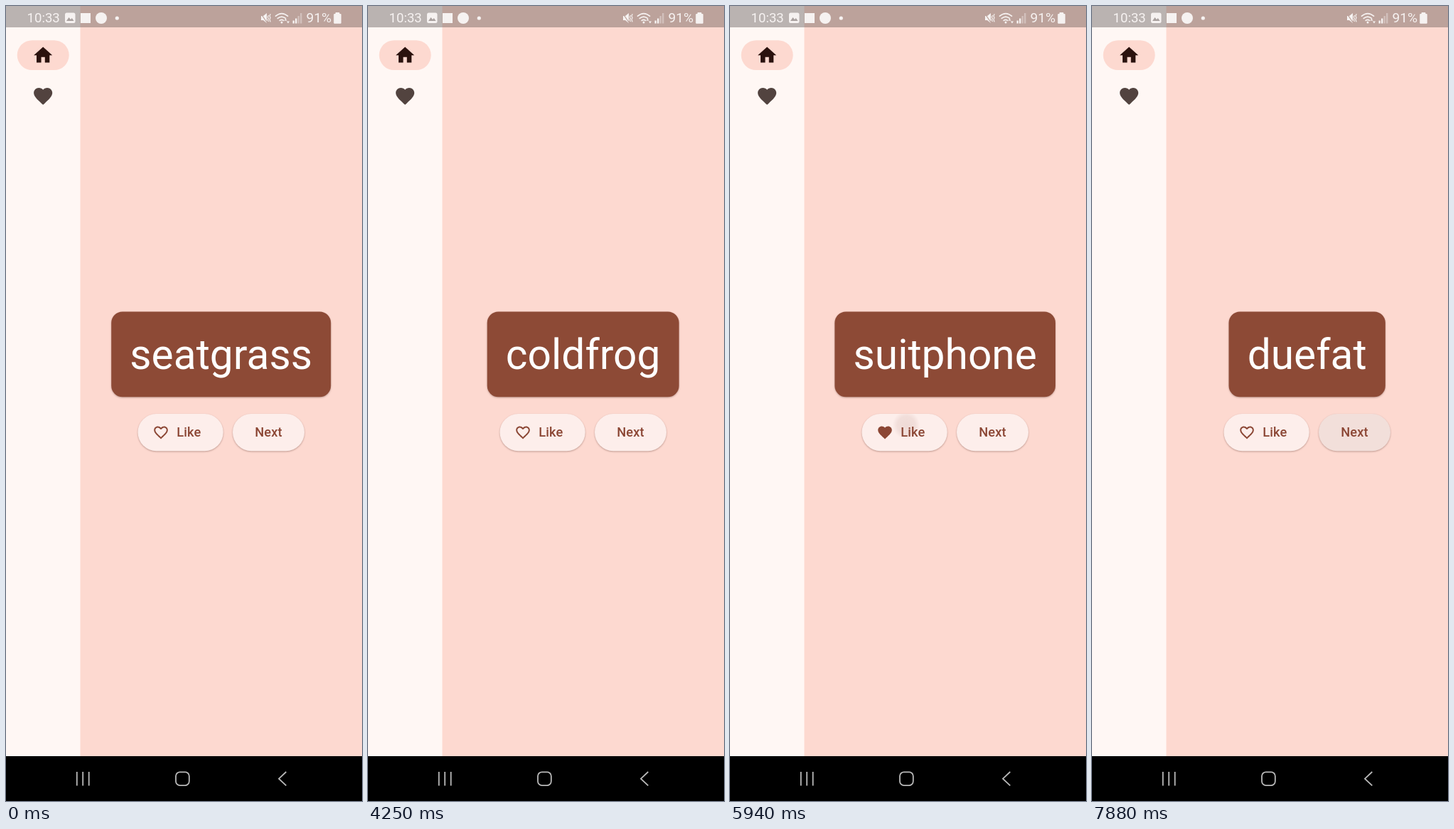
An HTML page for the animation above (8000 ms loop, 501 by 1117 pixels).

```html
<!DOCTYPE html>
<html lang="en">
<head>
<meta charset="utf-8">
<title>Word pair app</title>
<style>
  html, body { margin: 0; width: 100%; height: 100%; overflow: hidden; background: #fdd9d0; }
  svg { display: block; width: 100%; height: 100%; }
  text { font-family: Roboto, sans-serif; }
  .raised { filter: drop-shadow(0 1.4px 1.3px rgba(60, 20, 10, .32)); }
  .label { font-size: 18.27px; font-weight: 500; letter-spacing: .13px; fill: #8b4634; }
  .status { fill: #f6f2f1; }
  .line { fill: none; stroke: #f6f2f1; stroke-width: 1.7; stroke-linecap: round; }
  .nav { fill: none; stroke: #b9b9b9; stroke-width: 1.8; }
</style>
</head>
<body>
<svg viewBox="0 0 501 1117" preserveAspectRatio="none">
  <defs>
    <path id="heart" d="M12 21.35l-1.45-1.32C5.4 15.36 2 12.28 2 8.5 2 5.42 4.42 3 7.5 3c1.74 0 3.41.81 4.5 2.09C13.09 3.81 14.76 3 16.5 3 19.58 3 22 5.42 22 8.5c0 3.78-3.4 6.86-8.55 11.54z"/>
    <path id="heartHole" d="M12 18.65l-.1-.1C7.14 14.24 4 11.39 4 8.5 4 6.5 5.5 5 7.5 5c1.54 0 3.04.99 3.57 2.36h1.87C13.46 5.99 14.96 5 16.5 5c2 0 3.5 1.5 3.5 3.5 0 2.89-3.14 5.74-7.9 10.05z"/>
    <radialGradient id="soft">
      <stop offset="0" stop-color="#8f5548"/>
      <stop offset=".65" stop-color="#8f5548" stop-opacity=".8"/>
      <stop offset="1" stop-color="#8f5548" stop-opacity="0"/>
    </radialGradient>
    <clipPath id="buttons">
      <rect x="185.5" y="573" width="120.2" height="52.2" rx="26.1"/>
      <rect x="319" y="573" width="101" height="52.2" rx="26.1"/>
    </clipPath>
  </defs>

  <rect width="501" height="1117" fill="#fdd9d0"/>
  <rect width="104.5" height="1054" fill="#fff7f4"/>

  <!-- status bar -->
  <rect width="501" height="30" fill="#bca29b"/>
  <rect width="104.5" height="30" fill="#bab3b1"/>
  <g class="status">
    <text x="29.5" y="23.4" font-size="18.6">10:33</text>
    <rect x="83" y="9.5" width="14.5" height="14.5" rx="2.5"/>
    <path d="M85 21l3.5-5 2.5 3 1.8-2 2.8 4z" fill="#a9a19f"/>
    <rect x="105" y="10" width="14" height="14"/>
    <circle cx="134" cy="17" r="8"/>
    <circle cx="156.3" cy="17" r="2.6"/>
    <path d="M359 14h3l5-4v14l-5-4h-3z"/>
    <path d="M358.5 10.5l9 13" stroke="#bca29b" stroke-width="1.3"/>
    <path class="line" d="M369.3 13.5l-1 2 1 2-1 2 1 2M372 11.5l-1 2.5 1 2.5-1 2.5 1 3" style="stroke-width:1.2"/>
    <path class="line" d="M379.5 14.2q8.5-7.2 17 0M382.3 17.4q5.7-4.6 11.2 0M385.2 20.4q2.8-2 5.4 0"/>
    <circle cx="388" cy="23" r="1.5"/>
    <path d="M391.5 20.5l2-2.8 2 2.8zM395 21.5h4l-2 3z"/>
    <path d="M403.5 20.5h2.4v4h-2.4zM407 17.5h2.4v7H407z"/>
    <path d="M410.5 14h2.4v10.500h-2.4zM414 10h2.4v14.500H414z" opacity=".38"/>
    <text x="422.500" y="23.4" font-size="19.2">91%</text>
    <path d="M464 9.500h5v2h2.200v12.700h-9.400V11.500H464z" stroke="#f6f2f1" stroke-linejoin="round"/>
  </g>

  <!-- navigation rail -->
  <rect x="15.700" y="48.200" width="73" height="41.800" rx="20.900" fill="#fdd9d0"/>
  <path transform="translate(36.500 53.500) scale(1.305)" fill="#2b120e" d="M10 20v-6h4v6h5v-8h3L12 3 2 12h3v8z"/>
  <use href="#heart" transform="translate(36.500 111) scale(1.305)" fill="#52433f"/>

  <!-- word card -->
  <rect id="card" class="raised" y="429.500" height="119.800" rx="15.700" fill="#8d4a36"/>
  <text id="word" x="302.700" y="509.500" text-anchor="middle" font-size="58.700" fill="#fff"></text>

  <!-- buttons -->
  <g fill="#fdeeeb">
    <rect class="raised" x="185.500" y="573" width="120.200" height="52.200" rx="26.100"/>
    <rect class="raised" x="319" y="573" width="101" height="52.200" rx="26.100"/>
  </g>
  <rect id="tint" x="319" y="573" width="101" height="52.200" rx="26.100" fill="#8f4c38"/>
  <g clip-path="url(#buttons)"><circle id="ripple" fill="url(#soft)"/></g>
  <g transform="translate(206.300 587.500) scale(.9785)">
    <use href="#heart" fill="#8b4634"/>
    <use id="hole" href="#heartHole" fill="#fdeeeb"/>
  </g>
  <text class="label" x="240.300" y="605.400">Like</text>
  <text class="label" x="350.200" y="605.400">Next</text>

  <!-- system navigation -->
  <rect y="1054" width="501" height="63" fill="#000"/>
  <g class="nav">
    <path d="M99.800 1076v19.500M108.200 1076v19.500M116.700 1076v19.500"/>
    <rect x="239" y="1076.300" width="18.800" height="18.800" rx="5.800"/>
    <path d="M394.300 1076l-10.300 9.700 10.300 9.700"/>
  </g>
</svg>
<script>
  const LOOP = 8000, CENTER = 302.7, PADDING = 52.2;
  const $ = id => document.getElementById(id);
  const card = $('card'), word = $('word'), tint = $('tint'), ripple = $('ripple'), hole = $('hole');

  const words = [
    [0, 'seatgrass'], [3810, 'coldfrog'], [4500, 'illworld'],
    [5000, 'suitphone'], [6630, 'roundrole'], [7500, 'duefat']
  ];

  // Next button overlay: [time, opacity], linear between points
  const tints = [
    [0, 0], [3750, 0], [3750, .03], [3810, .03], [4250, 0],
    [4440, 0], [4440, .03], [4560, .055], [4690, 0],
    [4880, 0], [4880, .03], [4940, .055], [5000, .05], [5500, 0],
    [6630, 0], [6630, .02], [6750, .05], [7310, 0],
    [7440, 0], [7440, .03], [7880, .095], [8000, .095]
  ];

  const taps = [
    { at: 4440, x: 369, y: 598, r: 7, speed: .2, life: 250, alpha: .1 },
    { at: 4880, x: 369, y: 593, r: 4, speed: .14, life: 240, alpha: .09 },
    { at: 5940, x: 248, y: 589, r: 19, speed: .4, life: 180, alpha: .13 },
    { at: 6630, x: 353, y: 604, r: 9, speed: .2, life: 400, alpha: .12 },
    { at: 7440, x: 369, y: 598, r: 7, speed: .2, life: 300, alpha: .1 }
  ];

  function ramp(points, t) {
    const i = points.findIndex(p => p[0] > t);
    if (i < 1) return points[points.length - 1][1];
    const [t0, a] = points[i - 1], [t1, b] = points[i];
    return a + (b - a) * (t - t0) / (t1 - t0);
  }

  function setWord(text) {
    if (word.textContent === text) return;
    word.textContent = text;
    const width = word.getComputedTextLength() + PADDING;
    card.setAttribute('x', CENTER - width / 2);
    card.setAttribute('width', width);
  }

  function setRipple(t) {
    const tap = taps.find(p => t >= p.at && t < p.at + p.life);
    ripple.setAttribute('opacity', tap ? tap.alpha * (1 - (t - tap.at) / tap.life) : 0);
    if (!tap) return;
    ripple.setAttribute('cx', tap.x);
    ripple.setAttribute('cy', tap.y);
    ripple.setAttribute('r', tap.r + tap.speed * (t - tap.at));
  }

  function render(t) {
    setWord(words.filter(w => w[0] <= t).pop()[1]);
    tint.setAttribute('opacity', ramp(tints, t));
    setRipple(t);
    const liked = t >= 5940 && t < 6630;
    hole.setAttribute('visibility', liked ? 'hidden' : 'visible');
  }

  const start = performance.now();
  function tick() {
    render((performance.now() - start) % LOOP);
    requestAnimationFrame(tick);
  }
  tick();
</script>
</body>
</html>
```
